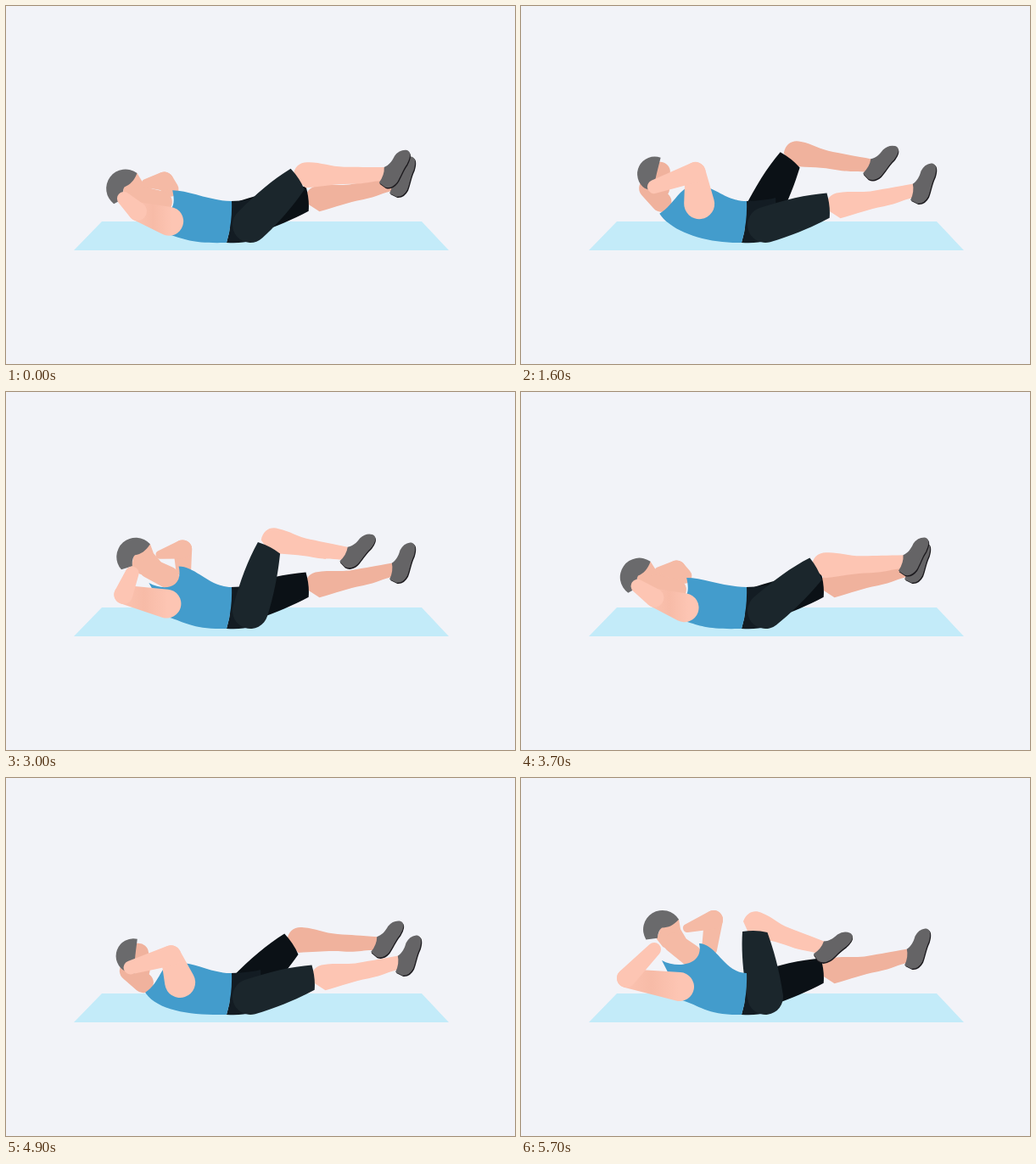
These frames come from a looping animation (600x422 px, 5800 ms). An HTML page:

```html
<!DOCTYPE html>
<html lang="en">
<head>
<meta charset="utf-8">
<title>Bicycle crunch</title>
<style>
  html, body { margin: 0; width: 100%; height: 100%; overflow: hidden; background: #f2f3f8; }
  svg { display: block; width: 100%; height: 100%; }
</style>
</head>
<body>
<svg id="stage" viewBox="0 0 600 422">
  <defs>
    <linearGradient id="arm">
      <stop offset="0" stop-color="#fdc5b3"/>
      <stop offset=".45" stop-color="#f7bba7"/>
      <stop offset=".8" stop-color="#fdc5b3"/>
    </linearGradient>
  </defs>
  <path d="M113 254H490L522 288H80Z" fill="#c3ebf9"/>
</svg>
<script>
const LOOP = 5800, STEP = 100;
const SKIN = '#fdc5b3', SHADE = '#f0b29d', FACE = '#f5baa5', HAIR = '#6a6a6c';
const SHIRT = '#439ccc', SHORTS = '#1b262c', HIP = '#131c23', BACK = '#0b1116';
const SHOE = '#656466', SOLE = '#1c1a1e';

// Turning points of the bend: positive brings the near knee in, negative the far one.
const turns = [
  [0, .14], [600, 1], [1250, 0], [1870, -1], [2580, 0], [2700, 0],
  [3200, 1], [3740, 0], [4400, -1], [5100, 0], [5700, 1], [5800, 1]
];

const THIGH = 'M0 21C30 21 56 17 75 13Q80 0 80 -16C56 -21 30 -22 0 -21A21 21 0 0 0 0 21Z';
const SHIN = 'M-14 4C-14 -8 -6 -14 4 -13C18 -13 28 -8 44 -8S70 -8 91 -8L90 8C76 8 70 12 52 12S20 15 0 17Z';
const FOOT = 'M0 0C5 -3 8 -8 10 -15Q14 -23 22 -24C30 -24 28 -14 26 -8C22 0 21 8 18 15Q13 24 5 23L-3 19Q2 9 0 0Z';
const PELVIS = 'M265 230Q290 229 300 226L303 268Q292 281 260 279Q267 256 265 230Z';

const svg = document.getElementById('stage');
const node = (tag, parent, attrs = {}) => {
  const el = document.createElementNS('http://www.w3.org/2000/svg', tag);
  for (const key in attrs) el.setAttribute(key, attrs[key]);
  return parent.appendChild(el);
};
const mix = (a, b, k) => a.map((v, i) => v + (b[i] - v) * k);
const add = ([x, y], dx, dy) => [x + dx, y + dy];
const polar = ([x, y], r, deg) => {
  const a = deg * Math.PI / 180;
  return [x + r * Math.cos(a), y + r * Math.sin(a)];
};

// Outline around two circles.
function capsule(a, ra, b, rb) {
  const [dx, dy] = [b[0] - a[0], b[1] - a[1]];
  const tilt = Math.max(-1, Math.min(1, (ra - rb) / Math.hypot(dx, dy)));
  const dir = Math.atan2(dy, dx) * 180 / Math.PI;
  const open = Math.acos(tilt) * 180 / Math.PI;
  const big = open > 90 ? 1 : 0;
  return `M${polar(a, ra, dir - open)}L${polar(b, rb, dir - open)}` +
    `A${rb} ${rb} 0 ${big} 1 ${polar(b, rb, dir + open)}L${polar(a, ra, dir + open)}` +
    `A${ra} ${ra} 0 ${1 - big} 1 ${polar(a, ra, dir - open)}Z`;
}

function makeLeg(parent, hip, skin, cloth, angles) {
  const shin = node('path', parent, { d: SHIN, fill: skin });
  const shoe = node('g', parent);
  node('path', shoe, { d: FOOT, fill: SOLE, transform: 'translate(1 1.3)' });
  node('path', shoe, { d: FOOT, fill: SHOE });
  const thigh = node('path', parent, { d: THIGH, fill: cloth });
  return k => {
    const { up, down, reach } = angles(k);
    const knee = polar(hip, 89, -up);
    const ankle = polar(polar(knee, reach, down), 8, down - 90);
    thigh.setAttribute('transform', `translate(${hip}) rotate(${-up})`);
    shin.setAttribute('transform', `translate(${knee}) rotate(${down}) scale(${reach / 90} 1)`);
    shoe.setAttribute('transform', `translate(${ankle}) rotate(${down + 9})`);
  };
}

const straight = () => ({ up: 16, down: -10, reach: 91 });
const bent = rest => k => ({ up: rest + 64 * k, down: -3 + 24 * k, reach: 94 - 10 * k });

// Each joint is [relaxed, crunched]; sizes are shoulder, elbow and hand radii.
function makeArm(parent, joints, sizes, upperFill, lowerFill) {
  const upper = node('path', parent, { fill: upperFill });
  const lower = node('path', parent, { fill: lowerFill });
  return k => {
    const [shoulder, elbow, hand] = joints.map(j => mix(...j, k));
    upper.setAttribute('d', capsule(shoulder, sizes[0], elbow, sizes[1]));
    lower.setAttribute('d', capsule(elbow, sizes[1], hand, sizes[2]));
  };
}

// The head swings around the waist.
function makeHead(parent, dist, skin, facePaths, hair) {
  const head = node('g', parent);
  facePaths.forEach(d => node('path', head, { d, fill: skin }));
  node('path', head, { d: hair, fill: HAIR });
  return k => {
    const lean = 22 + 25 * k;
    head.setAttribute('transform',
      `translate(${polar([250, 265], dist, 180 + lean)}) rotate(${lean - 37})`);
  };
}

// Collar and back are pulled by the offsets given.
function makeShirt(parent, left, right, back, collarL, collarR, pull) {
  const el = node('path', parent, { fill: SHIRT });
  return k => {
    const l = mix(...left, k), r = mix(...right, k), b = mix(...back, k);
    el.setAttribute('d', `M${l}C${add(l, ...collarL)} ${add(r, ...collarR)} ${r}` +
      `C${add(r, 20, 0)} 240 230 266 230Q267 256 260 279C220 280 ${add(b, ...pull)} ${b}Z`);
  };
}

const sides = { near: node('g', svg), far: node('g', svg) };
const NEAR_HIP = [288, 258], FAR_HIP = [281, 250];

// Near knee in, chest turned to the viewer
function buildNear(g) {
  const farArm = makeArm(g,
    [[[190, 218], [222, 202]], [[180, 213], [227, 167]], [[160, 214], [196, 177]]],
    [9, 11, 5], FACE, FACE);
  const farLeg = makeLeg(g, FAR_HIP, SHADE, BACK, straight);
  node('path', g, { d: PELVIS, fill: HIP });
  const nearLeg = makeLeg(g, NEAR_HIP, SKIN, SHORTS, bent(34));
  const head = makeHead(g, 124, FACE, [
    'M-3 16L0 0L19 -11L23 0L30 8L36 16L24 30L6 24Z',
    capsule([18, 17], 12, [40, 28], 13)
  ], 'M-15 19A22 22 0 0 1 19 -11C14 -3 8 1 1 2Q-3 6 -2 15Z');
  const shirt = makeShirt(g, [[172, 240], [166, 215]], [[194, 221], [210, 195]],
    [[194, 271], [190, 262]], [18, 10], [6, 26], [20, 6]);
  const nearArm = makeArm(g,
    [[[193, 255], [187, 246]], [[160, 243], [124, 236]], [[136, 231], [157, 202]]],
    [17, 11, 8], 'url(#arm)', SKIN);
  return [farArm, farLeg, nearLeg, head, shirt, nearArm];
}

// Far knee in, back turned to the viewer
function buildFar(g) {
  const farLeg = makeLeg(g, FAR_HIP, SHADE, BACK, bent(25));
  node('path', g, { d: PELVIS, fill: HIP });
  const nearLeg = makeLeg(g, NEAR_HIP, SKIN, SHORTS, straight);
  const head = makeHead(g, 119, SHADE, [
    capsule([10, 1], 12, [8, 20], 13),
    capsule([-3, 20], 12, [11, 36], 12)
  ], 'M-8 20A20.5 20.5 0 0 1 11 -16C8 -4 4 8 2 24Z');
  const shirt = makeShirt(g, [[165, 261], [162, 232]], [[198, 223], [220, 205]],
    [[165, 261], [162, 232]], [20, -12], [-22, -6], [14, 22]);
  const nearArm = makeArm(g,
    [[[200, 249], [218, 221]], [[183, 223], [223, 175]], [[136, 234], [173, 197]]],
    [18, 12, 8], SKIN, SKIN);
  return [farLeg, nearLeg, head, shirt, nearArm];
}

const parts = { near: buildNear(sides.near), far: buildFar(sides.far) };

function bendAt(t) {
  const i = turns.findIndex(turn => turn[0] > t);
  const [t0, b0] = turns[i - 1], [t1, b1] = turns[i];
  return b0 + (b1 - b0) * (t - t0) / (t1 - t0);
}

function render(now) {
  const bend = bendAt(Math.floor((now % LOOP) / STEP) * STEP);
  const active = bend > 0 ? 'near' : 'far';
  for (const name in sides) sides[name].style.display = name === active ? '' : 'none';
  parts[active].forEach(pose => pose(Math.abs(bend)));
}

const start = performance.now();
function tick() {
  render(performance.now() - start);
  requestAnimationFrame(tick);
}
tick();
</script>
</body>
</html>
```
